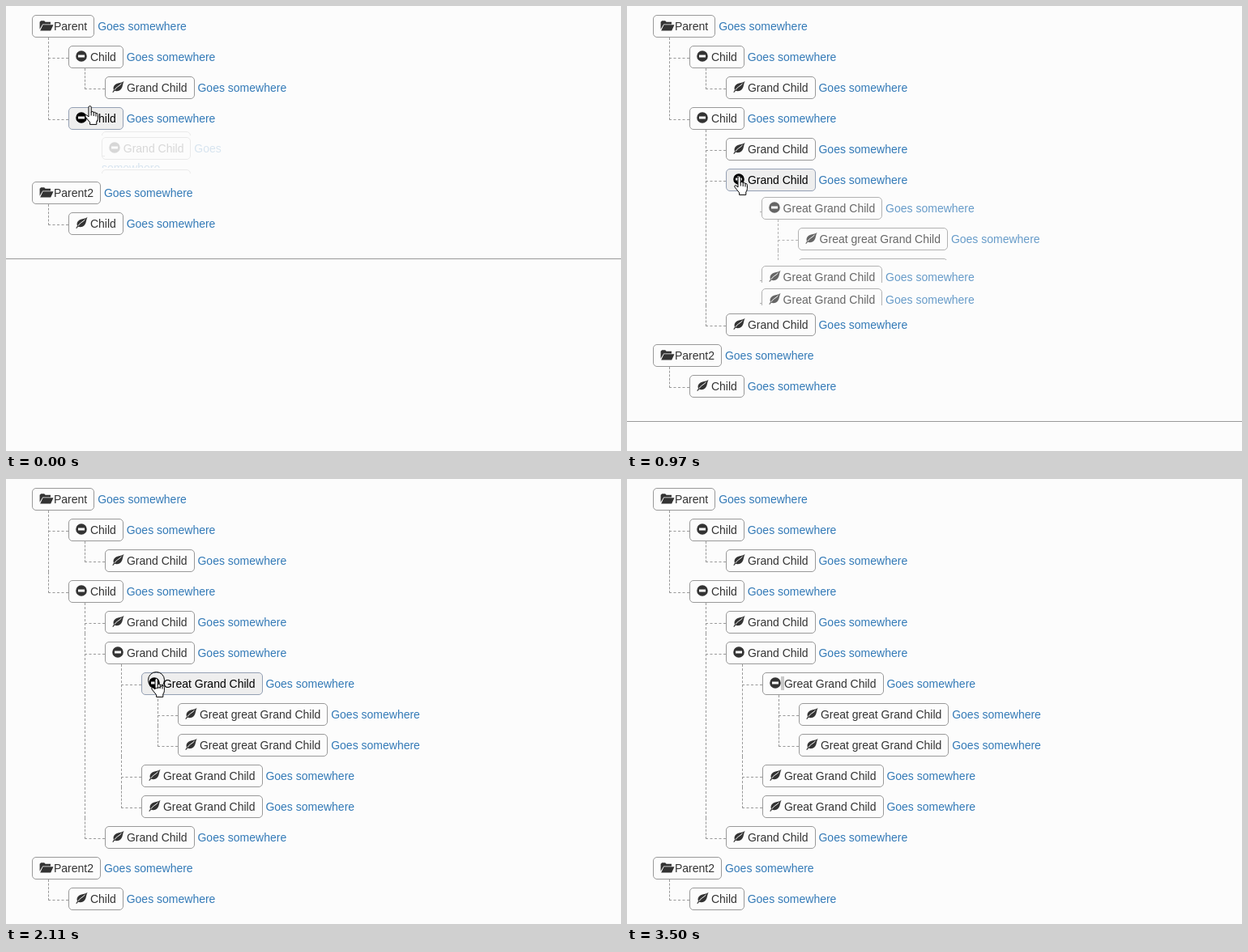
Animation of 759x550 px, one loop 3.54 s. Source, as an HTML page:

```html
<!DOCTYPE html>
<html lang="en">
<head>
<meta charset="utf-8">
<title>Collapsible tree</title>
<style>
* { box-sizing: border-box; }
html, body { margin: 0; width: 100%; height: 100%; overflow: hidden; background: #fcfcfc; }
body { position: relative; font: 14px/20px "Liberation Sans", Arial, sans-serif; color: #333; }
#tree { position: absolute; left: 0; top: 0; width: 1150px; padding: 1px 0 29px; border-bottom: 1px solid #999; }
ul { margin: 0; padding: 0 0 0 40px; }
#tree > ul { padding-left: 27px; }
li { list-style: none; position: relative; padding: 10px 5px 0; }
li li::before, li li::after { content: ""; position: absolute; left: -20px; }
li li::before { top: 0; width: 1px; height: 100%; border-left: 1px dashed #999; }
li li::after { top: 25px; width: 25px; height: 20px; border-top: 1px dashed #999; }
li li:last-child::before { height: 26px; }
li > span { display: inline-block; padding: 3px 8px; border: 1px solid #999; border-radius: 5px; }
li > span.hover { background: #eee; border-color: #94a0b4; color: #000; }
a { color: #337ab7; }
i { display: inline-block; position: relative; width: 14px; height: 0; }
i.folder { width: 18px; }
i svg { position: absolute; left: 0; top: -15px; fill: currentColor; overflow: visible; }
#tip { position: absolute; width: 131px; height: 22px; box-shadow: 2px 2px 1px #777; }
#tip div { height: 100%; border: 1px solid #767676; background: #fff; color: #575757;
  font: 12.5px/20px "Open Sans", "Noto Sans", sans-serif; padding-left: 5px; white-space: nowrap; }
#mark { position: absolute; left: 190px; top: 244px; width: 4px; height: 17px; background: #c8c8c8; }
#over { position: absolute; left: 0; top: 0; width: 759px; height: 550px; }
#over * { stroke: #000; fill: #fff; stroke-linejoin: round; }
#over #ring { fill: none; }
</style>
</head>
<body>
<div id="tree"></div>
<div id="mark"></div>
<div id="tip"><div>Collapse this branch</div></div>
<svg id="over">
  <path id="arrow" d="M.5.5V16.5L4.2 13 6.8 18.5 9.2 17.5 6.8 12H11.5Z"/>
  <g id="hand">
    <path d="M5 14V2.3Q5 .6 6.6.6T8.2 2.3V8.3Q8.4 7.2 9.8 7.4T11.2 9Q11.4 8 12.7 8.3T14 10Q14.3 9.1 15.3 9.5T16.4 11.3V15.5Q16.4 18 14.8 20V23.4H6.6V20.8L1.2 14.2Q.2 12.6 1.3 11.8T5 14Z"/>
    <path d="M8.2 8V12.5M11.2 9V13M14 10V13.5"/>
  </g>
  <circle id="ring" r="10"/>
</svg>
<script>
const $ = id => document.getElementById(id);
const disc = "M7-12.8a6.8 6.8 0 1 1 0 13.6a6.8 6.8 0 1 1 0-13.6z";
const shapes = {
  minus: disc + "M3-7.5h8v3H3z",
  plus: disc + "M5.5-10h3v2.5H11v3H8.5V-2h-3v-2.5H3v-3h2.5z",
  folder: "M.6-1.2V-10.2L2.2-11.8H6.2L7.6-10.2H14V-7.6H4.2ZM4.6-6.8H17.5L14.2.6H1.2Z",
  leaf: "M14.5-13.3C12.5-10.8 7-11.5 4-9C1.5-7 1-4.5 2-2.2L.3.5 1.2 1 3-1.2C6-.3 9.5-.8 11.5-4C13.2-6.8 13-10 14.5-13.3Z"
};

const icon = name => `<i class="${name}"><svg width="20" height="20" viewBox="0 -15 20 20">` +
  `<path fill-rule="evenodd" d="${shapes[name]}"/>` +
  (name == "leaf" ? '<path d="M3-2.3C5-6 8-6.3 11.5-10" fill="none" stroke="#fcfcfc"/>' : "") + "</svg></i>";

// A node is [label, children, id]
const list = (nodes, depth = 0) => "<ul>" + nodes.map(([label, kids, id]) =>
  `<li id="${id || ""}"><span>${depth ? icon(kids ? "minus" : "leaf") + " " : icon("folder")}${label}</span>` +
  ` <a>Goes somewhere</a>${kids ? list(kids, depth + 1) : ""}</li>`).join("") + "</ul>";

const grand = "Grand Child", great = "Great Grand Child", greater = "Great great Grand Child";
$("tree").innerHTML = list([
  ["Parent", [
    ["Child", [[grand]]],
    ["Child", [
      [grand],
      [grand, [[great, [[greater], [greater]], "c"], [great], [great]], "b"],
      [grand]
    ], "a"]
  ]],
  ["Parent2", [["Child"]]]
]);

const branches = ["a", "b", "c"].map(id => {
  const li = $(id);
  return {
    id,
    span: li.querySelector("span"),
    glyph: li.querySelector("path"),
    kids: [...li.lastElementChild.children].map(el => ({ el, w: el.offsetWidth, h: el.offsetHeight }))
  };
});

// start ms, branch, shown part, closed, hover, pointer, x, y, ring, tooltip opacity
const steps = [
  [0, "a", .178, 0, 1, "hand", 97, 123],
  [150, "a", 1, 0, 1, "hand", 97, 123],
  [270, "a", 1, 0, 0, "arrow", 104, 104],
  [420, "a", 1, 0, 0, "arrow", 121, 158],
  [540, "b", 1, 0, 0, "arrow", 136, 196],
  [700, "b", 1, 0, 1, "hand", 132, 210],
  [850, "b", 1, 0, 1, "hand", 132, 210, 1],
  [970, "b", .742, 1, 1, "hand", 132, 210],
  [1120, "b", 0, 1, 1, "hand", 132, 213, 0, .5],
  [1240, "b", 0, 1, 1, "hand", 132, 213, 0, 1],
  [1390, "b", 0, 1, 1, "hand", 132, 213, 1, 1],
  [1550, "b", .563, 0, 1, "arrow", 149, 236, 0, .15],
  [1700, "b", 1, 0, 0, "arrow", 163, 254],
  [1820, "b", 1, 0, 0, "arrow", 178, 268],
  [1970, "c", 1, 0, 1, "hand", 179, 246],
  [2110, "c", 1, 0, 1, "hand", 179, 246, 1],
  [2230, "c", .95, 1, 1, "hand", 179, 246],
  [2390, "c", 0, 1, 1, "hand", 179, 246, 0, .78],
  [2540, "c", 0, 1, 1, "hand", 179, 246, 1, 1],
  [2670, "c", .368, 0, 1, "hand", 179, 246],
  [2810, "c", 1, 0, 0]
];

// Scales size, padding and opacity of a list item together
function reveal({ el, w, h }, p) {
  el.style.cssText = p == 1 ? "" : p == 0 ? "display:none" :
    `overflow:hidden;width:${w * p}px;height:${h * p}px;padding:${10 * p}px ${5 * p}px 0;opacity:${p}`;
}

const show = (el, on) => el.style.display = on ? "" : "none";

function render(t) {
  const [, id, part, closed, hover, pointer, x, y, ring, tip] = steps.findLast(s => s[0] <= t);
  for (const b of branches) {
    const on = b.id == id;
    b.span.className = on && hover ? "hover" : "";
    b.glyph.setAttribute("d", on && closed ? shapes.plus : shapes.minus);
    b.kids.forEach(k => reveal(k, on ? part : 1));
  }
  for (const name of ["arrow", "hand"]) {
    show($(name), name == pointer);
    if (name == pointer) $(name).setAttribute("transform", `translate(${x} ${y})`);
  }
  show($("ring"), ring);
  if (ring) $("ring").setAttribute("transform", `translate(${x + 6.5} ${y + 2.5})`);
  show($("tip"), tip);
  $("tip").style.left = (id == "c" ? 184 : 137) + "px";
  $("tip").style.top = (id == "c" ? 272 : 236) + "px";
  $("tip").firstChild.style.opacity = tip || 0;
  show($("mark"), t >= 3500);
}

const start = performance.now();
function tick() {
  render((performance.now() - start) % 3540);
  requestAnimationFrame(tick);
}
tick();
</script>
</body>
</html>
```
